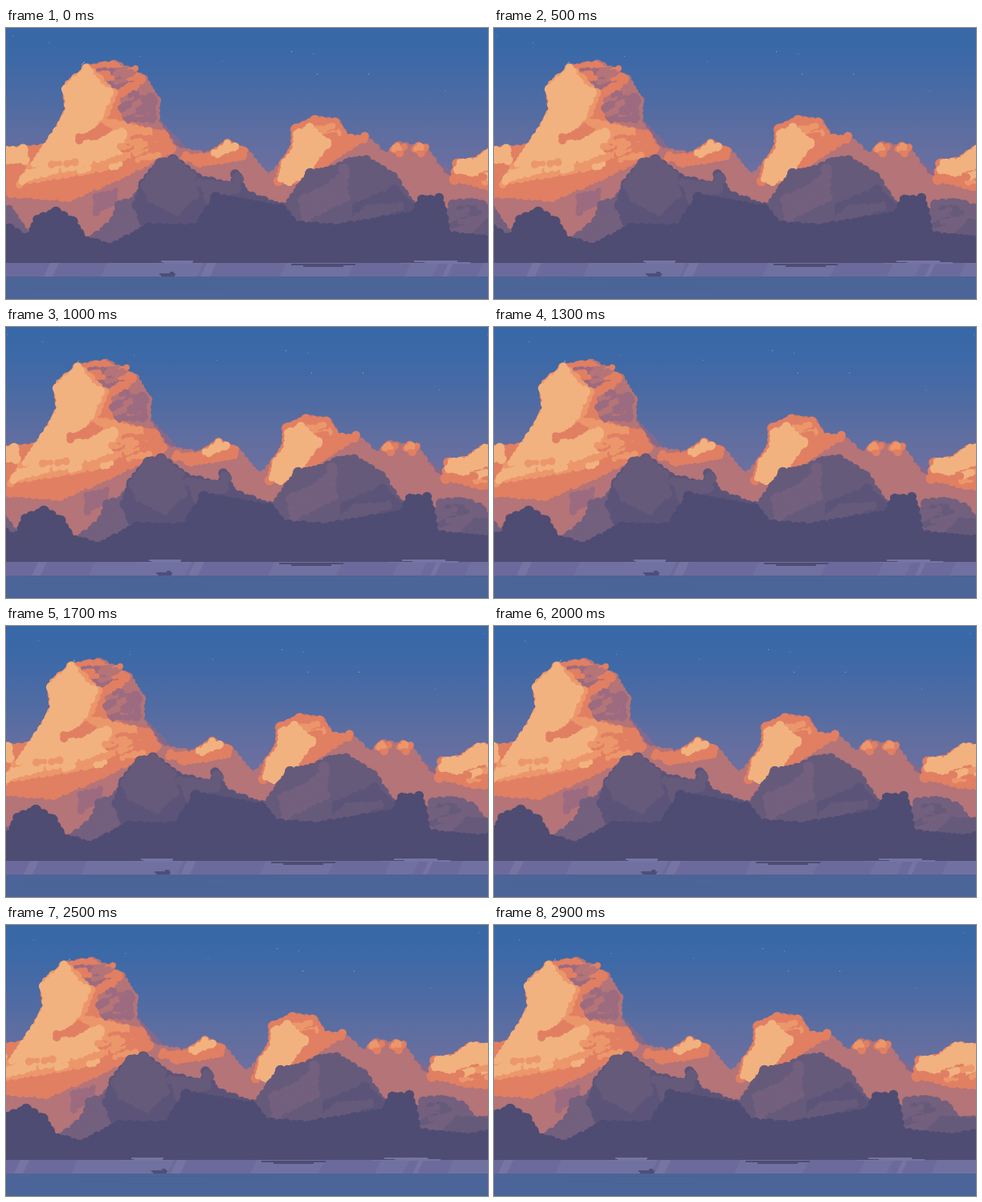
An HTML page with a canvas that plays this animation: 600 px wide and 338 px high, repeating every 3000 ms.

```html
<!DOCTYPE html>
<html>
<head>
<meta charset="utf-8">
<title>Evening clouds</title>
<style>
html, body { margin: 0; width: 100%; height: 100%; overflow: hidden; background: #4b6598; }
canvas { display: block; }
</style>
</head>
<body>
<canvas id="stage" width="600" height="338"></canvas>
<script>
const W = 600, H = 338, PAD = 60, SPAN = W + PAD * 2;
const LOOP = 3000, STEP = 100;
const SHORE = 293, WATERLINE = 310;
const stage = document.getElementById('stage').getContext('2d');

const C = {
  haze: '#85698c', rose: '#b47478', mauve: '#9c6b80', coral: '#e17f63',
  orange: '#ec976b', peach: '#f1b27f',
  lilac: '#735f7e', plum: '#665a7b', dusk: '#5c5478', night: '#4e4c72',
  shore: '#7071a0', stripe: '#6c6a9c', foam: '#7674a2', water: '#4b6598'
};

let seed = 7;
function random(min = 0, max = 1) {
  seed = (seed * 1664525 + 1013904223) >>> 0;
  return min + (max - min) * seed / 4294967296;
}

function makeLayer(paint) {
  const canvas = document.createElement('canvas');
  canvas.width = SPAN;
  canvas.height = H;
  const g = canvas.getContext('2d');
  g.translate(PAD, 0);
  paint(g);
  return canvas;
}

function disc(g, x, y, r) {
  g.beginPath();
  g.arc(x, y, r, 0, Math.PI * 2);
  g.fill();
}

// Fills a clockwise outline and sets round puffs along its edges.
function cloud(g, color, size, ...pts) {
  g.fillStyle = color;
  g.beginPath();
  for (let i = 0; i < pts.length; i += 2) g.lineTo(pts[i], pts[i + 1]);
  g.fill();
  for (let i = 0; i < pts.length; i += 2) {
    const x = pts[i], y = pts[i + 1];
    const dx = pts[(i + 2) % pts.length] - x, dy = pts[(i + 3) % pts.length] - y;
    const len = Math.hypot(dx, dy);
    for (let d = 0; d < len;) {
      const r = size * random(0.65, 1.25), inset = r * 0.5;
      disc(g, x + (dx * d - dy * inset) / len, y + (dy * d + dx * inset) / len, r);
      d += r * 1.4;
    }
  }
}

// Scatters small clumps inside an ellipse, cycling through the colors.
function dapple(g, colors, count, cx, cy, rx, ry) {
  for (let i = 0; i < count; i++) {
    const a = random(0, Math.PI * 2), k = Math.sqrt(random());
    const x = cx + rx * k * Math.cos(a), y = cy + ry * k * Math.sin(a);
    g.fillStyle = colors[i % colors.length];
    for (let j = -1; j <= 1; j++) disc(g, x + j * 5, y - j * random(0, 3), random(3, 5));
  }
}

function rect(g, color, x, y, w, h) {
  g.fillStyle = color;
  g.fillRect(x, y, w, h);
}

// A flat streak: a core line with a longer line below or above it.
function streak(g, color, x, y, w, side) {
  rect(g, color, x, y, w, 2);
  rect(g, color, x - w * 0.3, y + side * 2, w * 1.6, 2);
}

function slant(g, color, x, w) {
  g.fillStyle = color;
  g.beginPath();
  g.moveTo(x + 4, SHORE);
  g.lineTo(x + w + 4, SHORE);
  g.lineTo(x + w - 4, WATERLINE);
  g.lineTo(x - 4, WATERLINE);
  g.fill();
}

function paintStars(g) {
  for (const [x, y] of [[8, 9], [52, 18], [166, 35], [269, 41], [382, 32], [546, 78], [606, 9]]) {
    rect(g, '#7590be', x, y, 1, 1);
  }
  for (const [x, y] of [[355, 29], [387, 57], [451, 57]]) rect(g, '#9fb0d0', x, y, 1, 1);
  g.strokeStyle = '#92a5cb';
  g.beginPath();
  g.moveTo(94, 46);
  g.lineTo(98, 42);
  g.stroke();
}

function paintSunlit(g) {
  cloud(g, C.haze, 6, 180, 105, 214, 142, 235, 165, 160, 180);
  cloud(g, C.haze, 6, 298, 162, 337, 193, 340, 220, 290, 210);
  cloud(g, C.haze, 6, 520, 158, 555, 182, 575, 225, 510, 200);

  // Left tower
  cloud(g, C.rose, 6, -60, 150, 28, 150, 48, 147, 62, 128, 76, 102, 73, 74, 102, 48, 136, 43,
    174, 62, 190, 90, 188, 116, 212, 150, 250, 157, 277, 142, 300, 153, 333, 193, 333, 300, -60, 300);
  cloud(g, C.coral, 6, -60, 150, 28, 150, 48, 147, 62, 128, 76, 102, 73, 74, 102, 48, 134, 43,
    170, 66, 140, 100, 162, 122, 198, 132, 209, 152, 140, 188, 78, 214, -60, 204);
  cloud(g, C.mauve, 5, 116, 52, 148, 51, 160, 62, 138, 74, 117, 76);
  cloud(g, C.mauve, 6, 160, 84, 184, 88, 184, 114, 150, 116, 142, 98);
  dapple(g, [C.rose, C.mauve], 10, 162, 88, 18, 22);
  dapple(g, [C.coral, C.rose], 8, 140, 58, 22, 10);
  cloud(g, C.orange, 6, 76, 68, 102, 48, 118, 62, 136, 82, 124, 114, 180, 128, 176, 148,
    124, 176, 15, 194, 48, 147, 62, 128, 76, 102);
  cloud(g, C.peach, 6, 73, 74, 102, 48, 113, 66, 130, 82, 118, 112, 100, 134, 146, 128,
    150, 152, 104, 170, 18, 190, 48, 147, 62, 128, 76, 102);
  cloud(g, C.coral, 4, 90, 138, 120, 121, 130, 128, 112, 138);
  dapple(g, [C.coral, C.orange], 24, 172, 147, 26, 15);
  dapple(g, [C.orange, C.peach], 12, 85, 172, 55, 8);
  cloud(g, C.peach, 5, -60, 150, 24, 150, 26, 166, -60, 174);
  cloud(g, C.mauve, 5, 112, 208, 138, 203, 134, 220, 110, 230);

  // Small puff in the middle
  cloud(g, C.coral, 5, 222, 160, 250, 158, 277, 141, 299, 153, 296, 163, 240, 172);
  cloud(g, C.peach, 4, 257, 156, 277, 142, 286, 150, 262, 160);

  // Right tower
  cloud(g, C.rose, 6, 300, 220, 342, 168, 356, 150, 358, 124, 385, 112, 412, 116, 424, 134,
    450, 138, 472, 158, 490, 144, 524, 152, 548, 186, 650, 190, 650, 300, 300, 300);
  cloud(g, C.coral, 6, 336, 190, 344, 166, 356, 150, 358, 124, 385, 112, 412, 116, 424, 134,
    448, 137, 410, 162, 372, 192);
  dapple(g, [C.orange, C.coral], 12, 394, 135, 20, 15);
  cloud(g, C.peach, 5, 340, 188, 346, 166, 358, 152, 360, 130, 380, 122, 402, 144, 374, 182, 352, 195);
  for (const x of [488, 515]) {
    cloud(g, C.coral, 5, x - 8, 150, x, 145, x + 9, 150, x, 158);
    cloud(g, C.orange, 3, x - 6, 150, x + 1, 146, x + 3, 152);
  }

  // Far right bank
  cloud(g, C.coral, 6, 555, 188, 560, 166, 582, 164, 607, 148, 660, 152, 660, 204, 600, 200);
  cloud(g, C.peach, 5, 560, 178, 564, 166, 584, 164, 607, 148, 640, 150, 634, 172, 580, 184);
  dapple(g, [C.orange, C.peach, C.coral], 12, 606, 186, 34, 8);
}

function paintDark(g) {
  cloud(g, C.lilac, 6, -60, 222, 6, 224, 20, 246, 45, 280, -60, 280);
  cloud(g, C.lilac, 6, 106, 262, 132, 240, 140, 218, 168, 210, 180, 265, 110, 280);

  // Left dome and its ridge
  cloud(g, C.dusk, 6, 160, 220, 169, 192, 190, 166, 210, 162, 242, 186, 278, 194, 288, 181,
    300, 205, 346, 222, 350, 275, 180, 275);
  cloud(g, C.plum, 6, 171, 194, 190, 166, 210, 162, 234, 184, 236, 210, 212, 232, 178, 214);
  cloud(g, C.plum, 5, 242, 190, 278, 194, 290, 186, 288, 203, 250, 216);

  // Right dome
  cloud(g, C.plum, 6, 344, 226, 366, 194, 378, 178, 408, 174, 428, 163, 450, 162, 484, 184,
    518, 236, 540, 260, 350, 270);
  cloud(g, C.lilac, 6, 366, 212, 402, 196, 424, 176, 424, 214, 370, 240);
  cloud(g, C.dusk, 6, 436, 220, 486, 200, 516, 232, 490, 250, 430, 248);
  cloud(g, C.plum, 5, 424, 244, 450, 222, 492, 221, 466, 238);

  cloud(g, C.lilac, 6, 540, 240, 556, 217, 580, 214, 606, 222, 618, 240, 660, 240, 650, 285, 550, 280);
  cloud(g, C.plum, 5, 585, 254, 600, 240, 660, 243, 660, 275);
  dapple(g, [C.plum, C.lilac], 10, 572, 236, 20, 12);

  // Front bank
  cloud(g, C.night, 6, -60, 248, 6, 248, 26, 260, 38, 236, 64, 227, 86, 240, 96, 260, 130, 271,
    178, 246, 236, 247, 262, 208, 346, 224, 360, 243, 412, 247, 508, 230, 516, 211, 542, 211,
    552, 256, 618, 262, 660, 252, 660, 284, -60, 284);
  rect(g, C.night, -PAD, 275, SPAN, SHORE - 275);

  // Shore with reflections
  rect(g, C.shore, -PAD, SHORE, SPAN, WATERLINE - SHORE);
  for (const [x, w] of [[-60, 182], [242, 103], [430, 70], [535, 55]]) slant(g, C.stripe, x, w);
  for (const [x, w] of [[51, 11], [246, 12], [547, 6]]) slant(g, C.foam, x, w);
  streak(g, C.foam, 193, 290, 40, 1);
  streak(g, C.foam, 508, 290, 54, 1);
  streak(g, C.night, 370, 296, 50, -1);
  for (const x of [150, 232, 475, 580]) rect(g, C.night, x, 292, 46, 1);
}

function paintBoat(g) {
  const color = '#4d4f79';
  rect(g, color, 191, 306, 20, 2);
  rect(g, color, 193, 308, 17, 2);
  rect(g, color, 204, 304, 5, 2);
}

function paintScenery(g) {
  const sky = g.createLinearGradient(0, 0, 0, 215);
  ['#3868a8', '#3c69a7', '#476aa5', '#546ca2', '#626ea0', '#6c70a0', '#7072a0']
    .forEach((color, i, all) => sky.addColorStop(i / (all.length - 1), color));
  rect(g, sky, -PAD, 0, SPAN, WATERLINE);
  rect(g, C.water, -PAD, WATERLINE, SPAN, H - WATERLINE);
  rect(g, '#565f8f', -PAD, WATERLINE, SPAN, 1);
  for (let y = 313; y < 328; y += 3) rect(g, '#486394', random(0, 400), y, random(100, 250), 1);
}

// Speeds in pixels per second, all drifting left.
const layers = [
  [paintScenery, 0], [paintStars, 7.2], [paintSunlit, 11], [paintDark, 14.6], [paintBoat, 3.8]
].map(([paint, speed]) => ({ image: makeLayer(paint), speed }));

function draw() {
  const time = Math.floor((performance.now() % LOOP) / STEP) * STEP / 1000;
  for (const { image, speed } of layers) {
    stage.drawImage(image, -PAD - Math.round(speed * time), 0);
  }
  requestAnimationFrame(draw);
}
draw();
</script>
</body>
</html>
```
